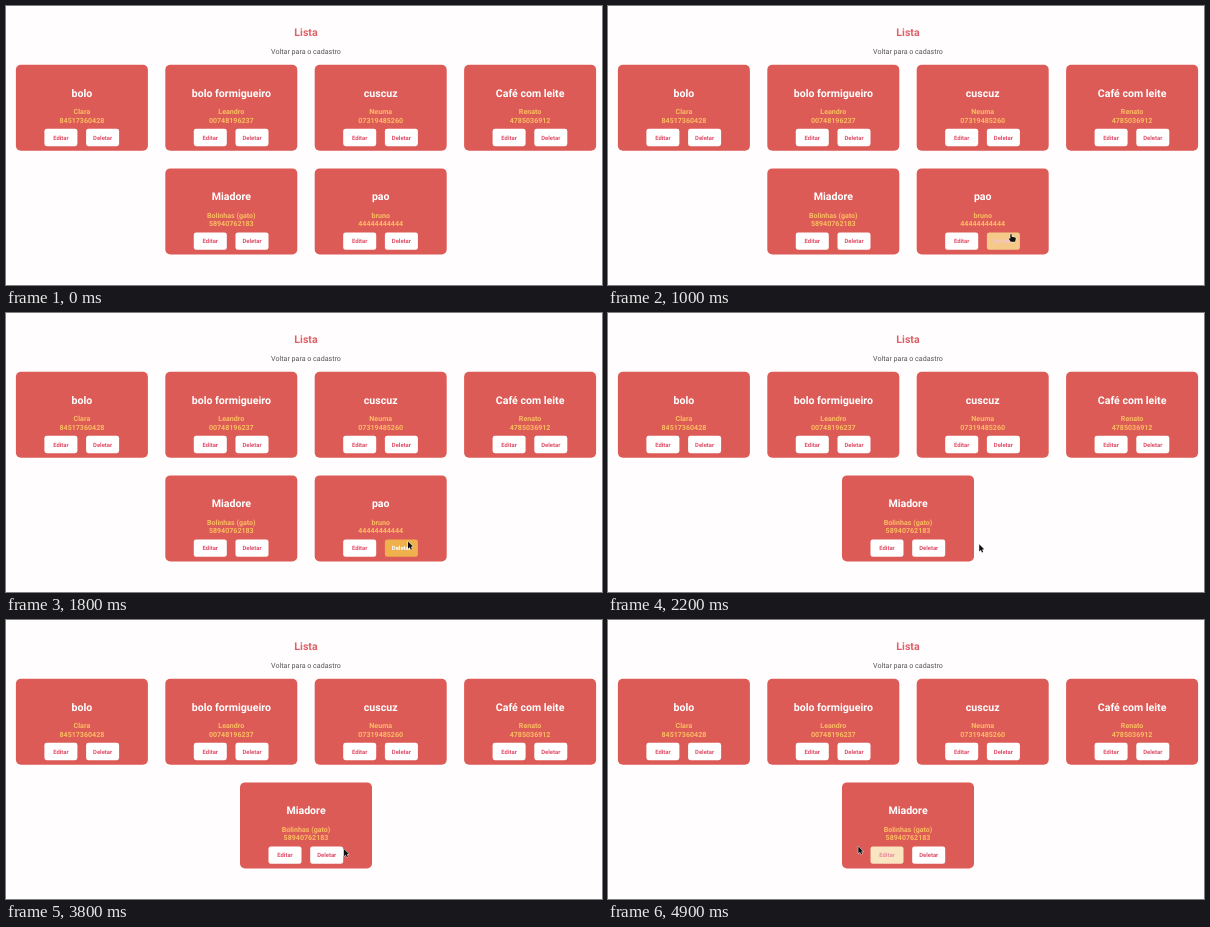
An HTML page for the animation above (5 s loop, 596 px wide and 279 px high).

```html
<!DOCTYPE html>
<html lang="pt-BR">
<head>
<meta charset="utf-8">
<title>Lista</title>
<style>
  html, body { margin: 0; width: 100%; height: 100%; overflow: hidden; background: #fffdfd; }
  svg { display: block; width: 596px; height: 279px; }
  text { font: 700 7.1px Roboto, sans-serif; text-anchor: middle; text-rendering: geometricPrecision; }
  .heading { font-size: 10.6px; fill: #de6068; }
  .link { font-weight: 400; fill: #555; }
  .card { fill: #dd5b57; }
  .dish { font-size: 10.6px; fill: #fff; }
  .info { fill: #fbbc62; }
  .label { font-size: 5.9px; }
  .cursor { fill: #111; stroke: #fff; stroke-width: .9; stroke-linejoin: round; paint-order: stroke; }
</style>
</head>
<body>
<svg id="stage" viewBox="0 0 596 279"></svg>
<script>
const LOOP = 5000, STEP = 100, FADE = 300, REMOVED_AT = 2200;
const stage = document.getElementById('stage');

const recipes = [
  ['bolo', 'Clara', '84517360428'],
  ['bolo formigueiro', 'Leandro', '00748196237'],
  ['cuscuz', 'Neuma', '07319485260'],
  ['Café com leite', 'Renato', '4785036912'],
  ['Miadore', 'Bolinhas (gato)', '58940762183'],
  ['pao', 'bruno', '44444444444'],
];

// Pointer stops: time, x, y, shape
const pointer = [
  [0, 0, 0, ''],
  [600, 446, 217, 'arrow'],
  [700, 427, 222, 'arrow'],
  [800, 411, 228, 'hand'],
  [900, 405, 229, 'hand'],
  [1000, 403, 228, 'hand'],
  [1700, 402, 228.5, 'arrow'],
  [2200, 371.2, 231.2, 'arrow'],
  [2300, 356, 239, 'arrow'],
  [3300, 339, 228.3, 'arrow'],
  [3800, 338, 229, 'arrow'],
  [4200, 334, 232, 'hand'],
  [4300, 329, 234.5, 'hand'],
  [4400, 325.5, 235.7, 'hand'],
  [4500, 303, 233, 'arrow'],
  [4600, 287, 231, 'hand'],
  [4700, 269, 229, 'hand'],
  [4800, 251, 227, 'arrow'],
  [4900, 250.3, 226.3, 'arrow'],
];

// Hover spans: card index, button, enter, leave
const hovers = [
  [5, 'Deletar', 800, REMOVED_AT],
  [4, 'Deletar', 4250, 4500],
  [4, 'Editar', 4600, 4800],
];

const shapes = {
  arrow: 'M0 0V7.2L1.7 5.7L2.8 8.2L4 7.7L2.9 5.3L5 5.1Z',
  hand: 'M-.7 .6Q0-.4.7.6V2.8L4.2 3.4Q5 3.7 4.8 4.7L4.2 7.7H-.2L-2.4 4.7Q-2.1 3.8-.7 4.8Z',
};

const clamp = v => Math.min(1, Math.max(0, v));
const mix = (a, b, k) => `rgb(${a.map((v, i) => Math.round(v + (b[i] - v) * k))})`;
const text = (cls, x, y, s, fill = '') =>
  `<text class="${cls}" x="${x}" y="${y}"${fill && ` fill="${fill}"`}>${s}</text>`;

function hoverLevel(t, card, name) {
  const span = hovers.find(h => h[0] === card && h[1] === name);
  if (!span) return 0;
  const [, , enter, leave] = span;
  const peak = clamp((Math.min(t, leave) - enter) / FADE);
  return clamp(peak - Math.max(0, t - leave) / FADE);
}

function button(x, y, name, level) {
  const back = mix([255, 255, 255], [240, 176, 76], level);
  const ink = mix([224, 78, 104], [255, 255, 255], level);
  return `<rect x="${x}" y="${y}" width="33" height="17.4" rx="2.4" fill="${back}"/>` +
    text('label', x + 16.5, y + 10.8, name, ink);
}

function card(t, index, x, y) {
  const [dish, owner, phone] = recipes[index];
  const mid = x + 66;
  return `<rect class="card" x="${x}" y="${y}" width="132" height="86" rx="5"/>` +
    text('dish', mid, y + 31.7, dish) +
    text('info', mid, y + 49.6, owner) +
    text('info', mid, y + 57.9, phone) +
    button(x + 28.5, y + 64, 'Editar', hoverLevel(t, index, 'Editar')) +
    button(x + 70.2, y + 64, 'Deletar', hoverLevel(t, index, 'Deletar'));
}

function draw(t) {
  const count = t < REMOVED_AT ? 6 : 5;
  let out = text('heading', 300, 30.4, 'Lista') +
    text('link', 300, 48.2, 'Voltar para o cadastro');
  for (let i = 0; i < count; i++) {
    const row = Math.floor(i / 4);
    const inRow = Math.min(4, count - row * 4);
    const x = 234 + (i % 4 - (inRow - 1) / 2) * 149.4;
    out += card(t, i, x, 58.8 + row * 103.6);
  }
  const [, x, y, shape] = pointer.findLast(p => p[0] <= t);
  if (shape) out += `<path class="cursor" transform="translate(${x} ${y})" d="${shapes[shape]}"/>`;
  stage.innerHTML = out;
}

const start = performance.now();
let shown = -1;
function tick() {
  const t = Math.floor((performance.now() - start) % LOOP / STEP) * STEP;
  if (t !== shown) draw(shown = t);
  requestAnimationFrame(tick);
}
tick();
</script>
</body>
</html>
```
